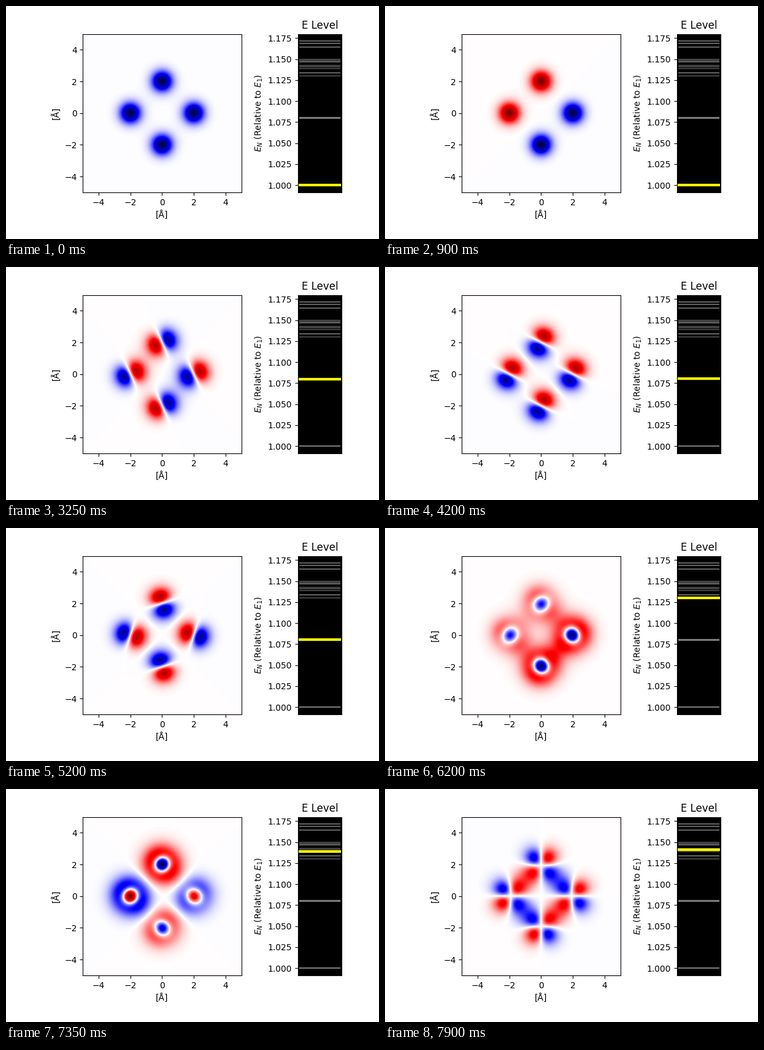
Write a matplotlib script that moves like this. It is 608 px wide and 380 px high and loops after 8000 ms.

```python
import numpy as np
import matplotlib.pyplot as plt
from matplotlib.animation import FuncAnimation

# Particle in four Gaussian wells (lengths in angstrom, energies in eV)
L, MU, SIGMA, V0 = 10.0, 2.0, 0.7, 153.0
HBAR2_2M = 3.81
GRID = 200
DX = L / GRID
x = (np.arange(GRID) + 0.5) * DX - L / 2

EVEN = np.arange(1, 49, 2)
ODD = np.arange(2, 50, 2)


def sines(n):
    return np.sqrt(2 / L) * np.sin(np.outer(n, np.pi * (x + L / 2) / L))


def well(phi, *centers):
    g = sum(np.exp(-(x - c) ** 2 / (2 * SIGMA ** 2)) for c in centers)
    return (phi * g) @ phi.T * DX


def solve(ny, nx, count, swap=0):
    """Lowest states of one parity sector; swap = +-1 is the x <-> y symmetry."""
    py, px = sines(ny), sines(nx)
    size = len(ny)
    kin = HBAR2_2M * (np.pi / L) ** 2
    h = np.diag(kin * np.add.outer(ny ** 2, nx ** 2).ravel())
    h -= V0 * np.kron(well(py, 0), well(px, -MU, MU))
    h -= V0 * np.kron(well(py, -MU, MU), well(px, 0))
    if swap:
        one = np.eye(size * size)
        flip = one.reshape(size, size, -1).transpose(1, 0, 2).reshape(one.shape)
        h += 500 * (one - swap * flip)
    vecs = np.linalg.eigh(h)[1]
    return [py.T @ vecs[:, k].reshape(size, size) @ px for k in range(count)]


def oriented(psi, px, py, sign):
    """Choose the sign of psi at the probe point (px, py)."""
    row, col = (int((v + L / 2) / DX) for v in (py, px))
    return psi * sign * np.sign(psi[row, col])


def orient_all(states, *probes):
    return [oriented(s, *p) for s, p in zip(states, probes)]


def turned(psi, degrees):
    """Member of the degenerate pair (psi, psi transposed)."""
    a = np.radians(degrees)
    return np.cos(a) * psi + np.sin(a) * psi.T


OUT = MU + 0.4
a1_s, a1_p, a1_2s = orient_all(solve(EVEN, EVEN, 3, 1),
                               (MU, 0, -1), (OUT, 0, 1), (MU, 0, -1))
b1_s, b1_p, b1_2s = orient_all(solve(EVEN, EVEN, 3, -1),
                               (MU, 0, -1), (OUT, 0, -1), (MU, 0, 1))
b2_p, b2_d = orient_all(solve(ODD, ODD, 2, 1), (MU, 0.4, 1), (OUT, 0.4, 1))
a2_p, = orient_all(solve(ODD, ODD, 1, -1), (MU, 0.4, 1))
e_s, e_p, e_p2, e_2s = orient_all(solve(EVEN, ODD, 4),
                                  (MU, 0, 1), (OUT, 0, 1), (OUT, 0, 1), (MU, 0, -1))

states = [
    a1_s, turned(e_s, 45), turned(e_s, 135), b1_s,
    a1_p, b2_p, turned(e_p, 12), turned(e_p, -78),
    turned(e_p2, 45), turned(e_p2, 135), b1_p, a2_p,
    a1_2s, turned(e_2s, -45), turned(e_2s, 45), b1_2s, b2_d,
]
levels = ([1.0] * 4 + [1.0796] * 4 + [1.0808] * 4
          + [1.130, 1.1335, 1.1335, 1.139, 1.1408, 1.1422]
          + [1.1465, 1.1465, 1.148, 1.1495]
          + [1.1646] * 2 + [1.1685] * 2 + [1.1714] * 2)

fig = plt.figure(figsize=(6.08, 3.8), dpi=100)
grid = fig.add_gridspec(1, 2, width_ratios=[5, 1], left=0.125, right=0.9,
                        bottom=0.2, top=0.88, wspace=0.2)
ax = fig.add_subplot(grid[0])
ax_e = fig.add_subplot(grid[1])

vmax = np.abs(states[0]).max()
image = ax.imshow(states[0], cmap="seismic", origin="lower",
                  extent=[-L / 2, L / 2, -L / 2, L / 2],
                  interpolation="bilinear", vmin=-vmax, vmax=vmax)
ax.set_xlabel("[Å]")
ax.set_ylabel("[Å]")

ax_e.set_facecolor("black")
ax_e.set_title("E Level")
ax_e.set_ylabel("$E_N$ (Relative to $E_1$)")
ax_e.set_xticks([])
for e in levels:
    ax_e.plot([0, 1], [e, e], color="gray", alpha=0.5)
marker, = ax_e.plot([0, 1], [1, 1], color="yellow", lw=3)

PER_STATE, HOLD = 10, 5


def update(frame):
    i, k = divmod(frame + 2, PER_STATE)
    j = min(i + 1, len(states) - 1)
    a = np.pi / 2 * max(k - HOLD, 0) / (PER_STATE - HOLD)
    c, s = np.cos(a), np.sin(a)
    image.set_data(c * states[i] + s * states[j])
    e = c ** 2 * levels[i] + s ** 2 * levels[j]
    marker.set_ydata([e, e])
    return image, marker


anim = FuncAnimation(fig, update, frames=160, interval=50, repeat=True)
plt.show()
```
